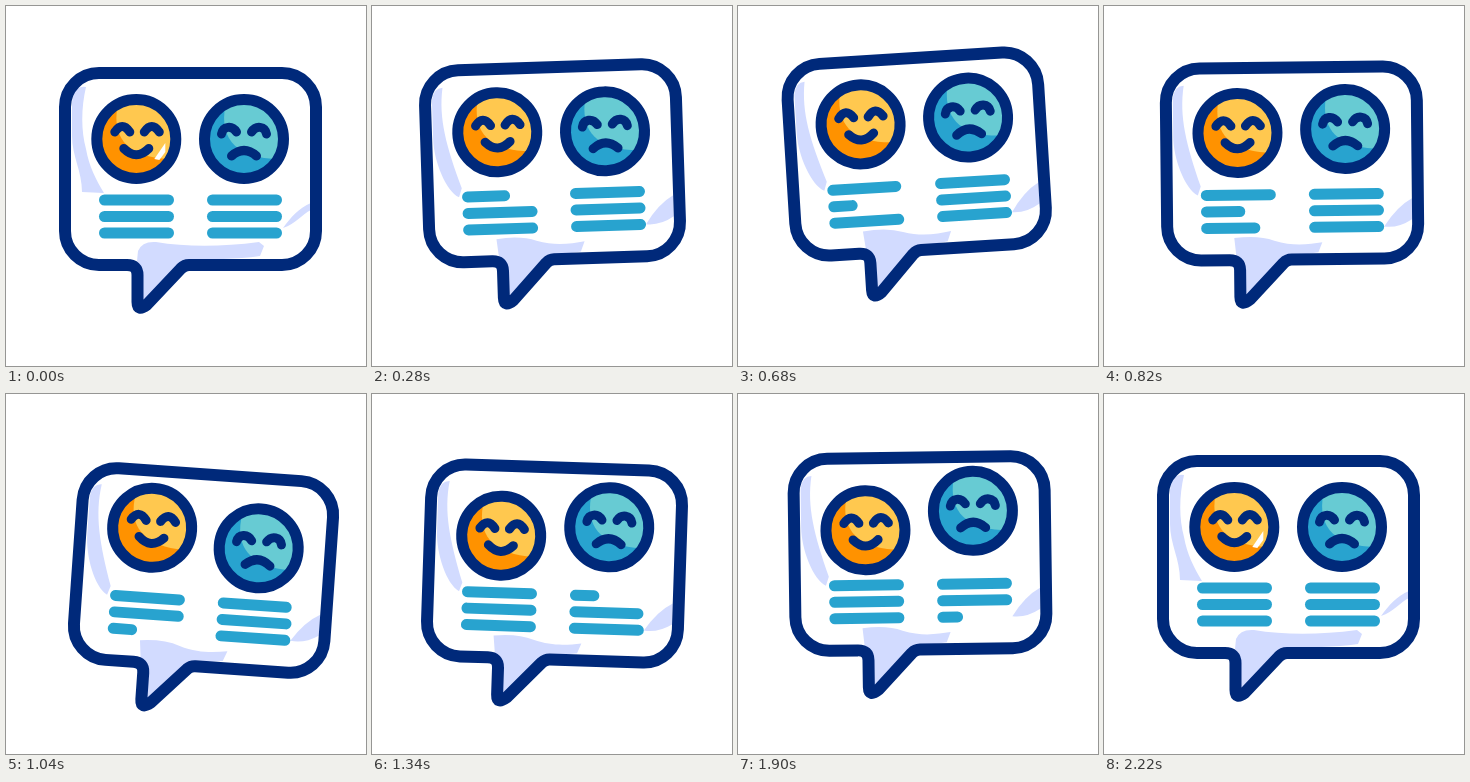
Recreate the animation shown at these times as an HTML page. Size 360 by 360 pixels, loop 2400 ms.

```html
<!DOCTYPE html>
<html lang="en">
<head>
<meta charset="utf-8">
<title>Feedback bubble</title>
<style>
  html, body { margin: 0; width: 100%; height: 100%; overflow: hidden; background: #fff; }
  svg { display: block; width: 100%; height: 100%; }
  .line { fill: none; stroke: #00297a; stroke-linecap: round; stroke-linejoin: round; }
  .face { stroke-width: 9; }
  .bars { stroke: #28a3cf; stroke-width: 11; stroke-linecap: round; }
  .shade { fill: #d2dbff; }
</style>
</head>
<body>
<svg viewBox="0 0 360 360">
  <defs>
    <clipPath id="disc"><circle r="39.5"/></clipPath>
    <path id="light" d="M-17 -40 C-27 -4 -12 21 40 20 V-40Z" clip-path="url(#disc)"/>
  </defs>
  <g id="bubble">
    <g id="restShade" class="shade">
      <path d="M66 96 Q68 79 80 81 C75 102 75 125 80 143 C83 160 90 174 98 187 L76 186 C76 165 66 150 66 130Z"/>
      <path d="M132 245 Q136 235 150 236 C180 241 215 241 253 236 L258 240 L254 250 C230 254 205 252 180 255 L137 296 V268 L131 255Z"/>
      <path d="M277 222 C285 211 293 202 305 197 V204 C296 208 290 218 277 222Z"/>
    </g>
    <g id="moveShade" class="shade">
      <path d="M66 96 Q68 84 77 84 C72 115 79 143 93 185 L90 194 C77 187 66 157 66 135Z"/>
      <path d="M126 237 Q150 234 166 240 C185 246 200 244 214 242 L210 252 L180 256 L137 296 V268 L128 256Z"/>
      <path d="M276 227 Q289 207 304 199 V220 Q290 229 276 227Z"/>
    </g>
    <path class="line" stroke-width="12" d="M93 67 H276 A34 34 0 0 1 310 101 V225 A34 34 0 0 1 276 259 H183 Q178.500 259 175 262.500 L141 298.500 Q131.500 306 131.500 296 V269 Q131.500 259 121 259 H93 A34 34 0 0 1 59 225 V101 A34 34 0 0 1 93 67Z"/>
    <g id="bars" class="bars"></g>
    <g id="happy">
      <circle r="39.5" fill="#ff9200"/>
      <use href="#light" fill="#ffc84f"/>
      <path id="shine" d="M29 4 L18 20 L23 21 L29 13Z" fill="#fff"/>
      <circle class="line" r="39.5" stroke-width="11"/>
      <path class="line face" d="M-21.500 -7 Q-14 -18 -6.500 -7 M8 -7 Q15.500 -18 23 -7 M-12.500 9.500 Q0 22 12.500 9.500"/>
    </g>
    <g id="sad">
      <circle r="39.5" fill="#28a3cf"/>
      <use href="#light" fill="#67cbd3"/>
      <circle class="line" r="39.5" stroke-width="11"/>
      <path class="line face" d="M-22.500 -5 C-21 -13 -12 -14 -7.500 -7 M7.500 -7 C12 -14 21 -13 22.500 -5 M-12.500 17 Q0 6 12.500 17"/>
    </g>
  </g>
</svg>
<script>
const LOOP = 2400, STEP = 20, START = 60, END = 2220;
const $ = id => document.getElementById(id);

// Each swing: points of [time, dx, dy, degrees] on one curve.
const swings = [
  [[60, 0, 0, 0], [520, -8.6, -14.5, -4.3], [600, -10.2, -18, -5.2]],
  [[600, -10.2, -18, -5.2], [820, 3.5, -5.5, -0.6], [1040, 13, 13.5, 4], [1140, 11.5, 21, 6]],
  [[1140, 11.5, 21, 6], [1340, -2, 6.5, 1.9], [1680, -8.2, -9, -2.5]],
  [[1680, -8.2, -9, -2.5], [1900, -2.5, -3.5, -0.8], [2220, 0, 0, 0]]
];

// Vertical drift of each face inside the bubble: [time, dy].
const happyBob = [[60, 0], [520, -6], [820, -1], [1040, -9], [1340, 4], [1900, 6], [2220, 0]];
const sadBob = [[60, 0], [520, -1], [820, -4], [1040, 4], [1340, -8], [1900, -12], [2220, 0]];

const bars = Array.from({ length: 6 }, (_, i) => {
  const bar = document.createElementNS("http://www.w3.org/2000/svg", "line");
  const x = i < 3 ? 98.5 : 206.500, y = 194 + (i % 3) * 16.5;
  for (const [name, value] of Object.entries({ x1: x, x2: x + 64, y1: y, y2: y })) {
    bar.setAttribute(name, value);
  }
  $("bars").append(bar);
  return { bar, x, turn: 410 + 300 * i };
});

// Polynomial through all points of a swing.
function through(points, t, column) {
  return points.reduce((sum, p) => sum + points.reduce(
    (w, q) => q === p ? w : w * (t - q[0]) / (p[0] - q[0]), p[column]), 0);
}

// Smooth curve with slopes taken from neighbouring points.
function smooth(points, t) {
  const i = Math.max(0, points.findIndex(p => t <= p[0]) - 1);
  const [a, b] = [points[i], points[i + 1]];
  const span = b[0] - a[0], u = (t - a[0]) / span;
  const slope = k => {
    const p = points[k - 1], q = points[k + 1];
    return p && q ? (q[1] - p[1]) / (q[0] - p[0]) * span : 0;
  };
  const v = 1 - u;
  return a[1] * v * v * (1 + 2 * u) + b[1] * u * u * (3 - 2 * u)
    + slope(i) * u * v * v - slope(i + 1) * u * u * v;
}

function draw(time) {
  const t = Math.min(END, Math.max(START, Math.floor(time / STEP) * STEP));
  const resting = t === START || t === END;
  const swing = swings.find(s => t <= s[s.length - 1][0]);
  const [x, y, angle] = [1, 2, 3].map(c => through(swing, t, c));

  $("bubble").setAttribute("transform", `translate(${x} ${y}) rotate(${angle} 184.5 163)`);
  $("happy").setAttribute("transform", `translate(130.3 ${133 + smooth(happyBob, t)})`);
  $("sad").setAttribute("transform", `translate(238 ${133 + smooth(sadBob, t)})`);
  for (const { bar, x: left, turn } of bars) {
    const part = Math.min(1, 0.2 + 0.8 * Math.abs(t - turn) / 275);
    bar.setAttribute("x2", left + 64 * part);
  }
  $("restShade").style.display = $("shine").style.display = resting ? "" : "none";
  $("moveShade").style.display = resting ? "none" : "";
}

const begin = performance.now();
function tick() {
  draw((performance.now() - begin) % LOOP);
  requestAnimationFrame(tick);
}
tick();
</script>
</body>
</html>
```
